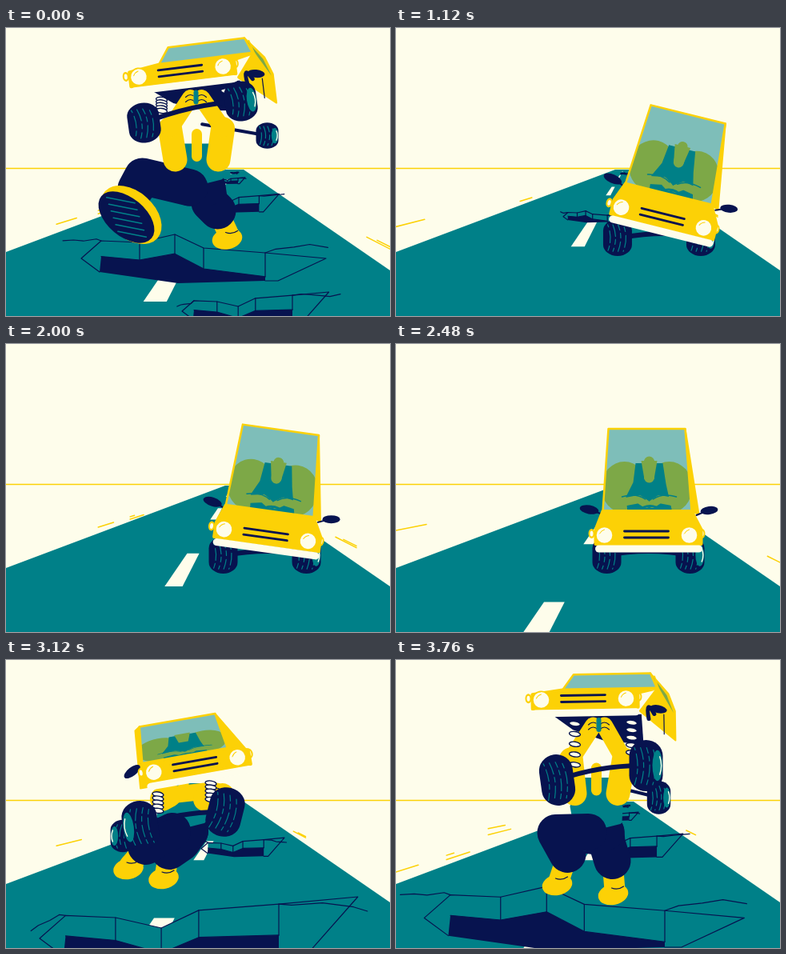
Recreate the animation shown at these times as an HTML page with a canvas. Size 480x360 px, loop 3840 ms.

```html
<!DOCTYPE html>
<html lang="en">
<head>
<meta charset="utf-8">
<title>Bumpy road</title>
<style>
  html, body { margin: 0; width: 100%; height: 100%; overflow: hidden; background: #fefdeb; }
  canvas { display: block; width: 480px; height: 360px; }
</style>
</head>
<body>
<canvas id="stage" width="480" height="360"></canvas>
<script>
const ctx = document.getElementById('stage').getContext('2d');
const CREAM = '#fefdeb', YELLOW = '#fcd106', TEAL = '#008088', NAVY = '#07134f';
const GLASS = 'rgba(0,128,136,.5)';
const STEP = 80, FRAMES = 48, SHRINK = 0.765;
const VP = { x: 285, y: 176 };
ctx.lineCap = ctx.lineJoin = 'round';

// Helpers
const rad = deg => deg * Math.PI / 180;
const mix = (a, b, t) => a + (b - a) * t;

function seeded(seed) {
  return () => (seed = (seed * 16807 + 11) % 2147483647) / 2147483647;
}
function trace(points) {
  ctx.beginPath();
  points.forEach(p => ctx.lineTo(...p));
}
function fill(points, color) {
  trace(points);
  ctx.closePath();
  ctx.fillStyle = color;
  ctx.fill();
}
function line(points, color, width) {
  trace(points);
  ctx.strokeStyle = color;
  ctx.lineWidth = width;
  ctx.stroke();
}
function softFill(points, color, round) {
  fill(points, color);
  line([...points, points[0]], color, round);
}
function oval(x, y, rx, ry, color, rot = 0) {
  ctx.beginPath();
  ctx.ellipse(x, y, rx, ry, rad(rot), 0, 7);
  ctx.fillStyle = color;
  ctx.fill();
}
function bend(from, control, to, color, width) {
  ctx.beginPath();
  ctx.moveTo(...from);
  ctx.quadraticCurveTo(...control, ...to);
  ctx.strokeStyle = color;
  ctx.lineWidth = width;
  ctx.stroke();
}
function local(x, y, rot, draw) {
  ctx.save();
  ctx.translate(x, y);
  ctx.rotate(rad(rot));
  draw();
  ctx.restore();
}

// Scenery: everything on the ground shrinks towards the vanishing point
const ground = (dx, dy, k) => [VP.x + dx * k, VP.y + dy * k];

function drawStreaks(frame) {
  const random = seeded(58);
  for (let i = 0; i < 14; i++) {
    const side = i % 2 ? 1 : -1;
    const slope = side < 0 ? mix(.2, .34, random()) : mix(.44, .54, random());
    const born = Math.floor(random() * 12), size = mix(.8, .99, random());
    const age = (frame - born + 24) % 12;
    if (age > 3) continue;
    const reach = side < 0 ? 290 : 200, k = SHRINK ** age;
    line([1, size].map(r => ground(side * reach * r, reach * r * slope, k)), YELLOW, 1.5);
  }
}

function drawDashes(frame) {
  for (let j = -1; j < 4; j++) {
    const k = SHRINK ** (frame % 4 + 4 * j);
    const corner = (dy, side) => ground(dy * (side * .088 - .595), dy, k);
    fill([corner(112, -1), corner(112, 1), corner(166, 1), corner(166, -1)], CREAM);
  }
}

// frame, centre x, far rim y, scale, direction of the broken edge
const HOLES = [
  [0, 244, 268, 1, 1], [0, 290, 214, .33, -1], [0, 310, 342, .6, -1],
  [6, 300, 222, .32, 1], [14, 245, 231, .24, 1], [39, 237, 322, 1.3, -1], [39, 295, 229, .34, -1]
];

function drawHole([born, cx, cy, scale, dir], frame) {
  const age = (frame - born + 8 + FRAMES) % FRAMES - 8;
  if (age > 13) return;
  const k = SHRINK ** age, random = seeded(born * 31 + cy);
  const at = (x, y) => ground(cx + x * scale - VP.x, cy + y * scale - VP.y, k);
  const corners = [[-125, -2], [-77, 0], [-33, -10 * dir], [3, 7 * dir], [80, 13 * dir]];
  const rim = corners.map(p => at(...p));
  const foot = corners.map(([x, y]) => at(x, y + 22 + (x + 77) / 20));
  const crack = (x, y, dx) => {
    const points = [at(x, y)];
    for (let i = 0; i < 4; i++) points.push(at(x += dx * mix(.5, 1.4, random()), y += mix(-5, 6, random())));
    line(points, NAVY, 1.2);
  };
  const front = [at(80, 48), at(-29, 51), at(-127, 37)];
  fill([...rim, ...foot.slice().reverse()], TEAL);
  fill([...foot, ...front], NAVY);
  line([at(-127, 37), at(-150, 20), ...rim, at(156, 20 * dir), at(96, 48), at(80, 48)], NAVY, 1.2);
  line(foot, NAVY, 1.2);
  rim.slice(1).forEach((p, i) => line([p, foot[i + 1]], NAVY, 1.2));
  crack(-125, -2, -12);
  crack(80, 13 * dir, 22);
}

function drawScenery(frame) {
  ctx.fillStyle = CREAM;
  ctx.fillRect(0, 0, 480, 360);
  fill([[274, 177], [297, 177], [480, 303], [480, 360], [0, 360], [0, 280]], TEAL);
  line([[0, 175.5], [480, 175.5]], YELLOW, 1.5);
  drawStreaks(frame);
  drawDashes(frame);
  HOLES.forEach(hole => drawHole(hole, frame));
}

// Poses: all parts sit relative to the car. glass: sideways turn, height;
// wheels: left, right, rear, radii, splay; legs: knee, ankle, toe
const JUMP = {
  car: [237, 131, -10], glass: [-13, 46], wheels: [-69, 76, 37, 59, -91, 89, 22, 31, 14],
  neck: [-15, 21], waist: [-18, 64], left: [-45, 91, -62, 102, -82, 127], right: [-17, 97, -33, 108, -38, 139],
  sole: [0], size: [1]
};
const STAND = {
  car: [234.5, 49, -1], glass: [36, 19], wheels: [-33, 101, 78, 83, 94, 123, 21, 32, 0],
  neck: [16, 96], waist: [17, 147], left: [-35, 167, -20, 194, -31, 229], right: [29, 179, 36, 202, 39, 241],
  sole: [0], size: [1]
};
const STRIDE = {
  car: [218.5, 54.5, -7], glass: [36, 20], wheels: [-46, 64, 75, 37, 108, 80, 20, 25, -8],
  neck: [20, 88], waist: [22, 126], left: [-48, 131, -56, 146, -68, 178], right: [36, 164, 46, 174, 60, 206],
  sole: [1], size: [1]
};
const DRIVE = { ...JUMP, glass: [0, 103], wheels: [-50, 25, 54, 25, 0, 10, 18, 23, 0], size: [0] };
const at = (pose, x, y, rot = pose.car[2]) => ({ ...pose, car: [x, y, rot] });

const KEYS = [
  [0, STRIDE], [2, at(STAND, 215, 62)], [4, at(JUMP, 205, 176)], [6, at(DRIVE, 199, 246, -14)],
  [14, at(DRIVE, 333, 237, 14)], [19, at(DRIVE, 198, 242, -12)], [25, at(DRIVE, 325, 239, 8)],
  [31, at(DRIVE, 313.5, 239, 0)], [36, at(DRIVE, 258, 241, -5)], [39, JUMP], [42, at(JUMP, 241, 138)],
  [44, at(STRIDE, 230, 59)], [47, STAND], [48, STRIDE]
];

function poseAt(frame) {
  const next = KEYS.findIndex(key => key[0] > frame);
  const [start, from] = KEYS[next - 1], [end, to] = KEYS[next];
  const t = (frame - start) / (end - start), eased = t * t * (3 - 2 * t);
  const pose = {};
  for (const part in from) pose[part] = from[part].map((v, i) => mix(v, to[part][i], eased));
  return pose;
}

// Vehicle
function drawWheel(x, y, rx, ry, rot, hub = 0) {
  local(x, y, rot, () => {
    ctx.beginPath();
    ctx.roundRect(-rx, -ry, rx * 2, ry * 2, { x: rx, y: ry * .62 });
    ctx.fillStyle = NAVY;
    ctx.fill();
    ctx.setLineDash([15, 4, 6, 5]);
    for (let i = -1; i < 3; i++) {
      const tx = rx * (i * .36 - .2), bow = rx * .25 * (hub || 1);
      ctx.lineDashOffset = i * 8;
      bend([tx - bow * .5, -ry * .7], [tx + bow, 0], [tx - bow * .5, ry * .75], TEAL, 1.2);
    }
    ctx.setLineDash([]);
    if (hub) {
      oval(hub * rx * .68, 0, rx * .3, ry * .6, TEAL);
      bend([hub * rx * .82, -ry * .35], [hub * rx, 0], [hub * rx * .82, ry * .35], CREAM, 1.4);
    }
  });
}

function drawSpring(x, top, bottom) {
  const turns = 5;
  for (let i = 0; i < turns; i++) {
    const y = mix(top, bottom, i / (turns - 1));
    oval(x, y, 7, 3, CREAM, 8);
    ctx.strokeStyle = NAVY;
    ctx.lineWidth = 1.4;
    ctx.stroke();
  }
}

function drawDriver(withHead) {
  for (const side of [-1, 1]) oval(side * 28, -30, 29, 32, YELLOW);
  fill([[-14, -60], [20, -60], [24, -34], [32, 2], [-24, 2], [-26, -18], [-17, -36]], TEAL);
  fill([[-7, -63], [13, -63], [9, -40], [-3, -40]], YELLOW);
  if (withHead) line([[3, -62], [3, -42]], YELLOW, 13);
  for (const side of [-1, 1]) {
    line([[3 + side * 34, -11], [3 + side * 13, -15], [3 + side * 4, -9]], YELLOW, 10);
    bend([3 + side * 34, -18], [3 + side * 16, -23], [3 + side * 5, -15], TEAL, 1.5);
  }
  bend([-12, 0], [4, -13], [20, 0], TEAL, 3);
}

function drawUnderside({ car, glass: [turn] }) {
  if (turn < 10) return;
  local(0, 0, car[2], () =>
    fill([[-38, 20], [72, 20], [74, 58], [24, 52], [-14, 38]], NAVY));
}

function drawSide(turn, roof, sill) {
  const back = 70 + turn * 1.25, up = turn * .47, down = 12 + turn * 1.15;
  softFill([roof, [back - 9, up - 22], [back - 1, up], [back - 1, down], [70, 16], sill], YELLOW, 2);
  if (turn < 12) return;
  fill([[roof[0] + 2, roof[1] + 3], [back - 11, up - 20], [back - 3, up + 2], [sill[0] + 6, sill[1] + 6]], GLASS);
  line([[roof[0] + 5, roof[1] + 4], [back - 14, up - 4]], YELLOW, 2);
  line([[back - 15, up + 4], [back - 15, down - 8]], NAVY, 1.2);
  bend([81, 26], [77, 0], [88, 20], NAVY, 5);
}

function drawCar({ car, glass: [turn, tall] }) {
  const lift = Math.min(1, (103 - tall) / 60);
  const base = -30 + 18 * lift, top = base - tall;
  const pane = [[turn - 48, top], [turn + 48, top], [turn + 56, base], [turn - 55 - turn * .2, base]];
  const [roofLeft, roofRight, sillRight, sillLeft] = pane;
  local(0, 0, car[2], () => {
    if (turn > 8) drawSide(turn, roofRight, sillRight);
    else softFill([roofRight, [65, base + 4], sillRight], YELLOW, 2);
    if (turn < -4) softFill([roofLeft, [roofLeft[0] - 6, top + 4], [-73, base + 30], [-60, base + 30], sillLeft], YELLOW, 2);
    fill(pane, CREAM);
    if (tall > 30) {
      ctx.save();
      trace(pane);
      ctx.clip();
      ctx.translate(turn, base);
      ctx.scale(1, tall / 103);
      drawDriver(tall > 70);
      ctx.restore();
    }
    fill(pane, GLASS);
    line([sillLeft, roofLeft, roofRight, sillRight], YELLOW, 2.5);

    if (turn < 10) {
      oval(-72 - 8 * lift, base - 2 + 10 * lift, 12, 5.5, NAVY, 10 - 40 * lift);
      line([[-66, base], [-55, base + 4]], NAVY, 2);
    }
    if (turn > -5) {
      oval(78 + 15 * lift, base - 1 + 27 * lift, 11, 5, NAVY, -8 + 20 * lift);
      if (lift < .5) line([[74, base], [62, base + 5]], NAVY, 2);
    }
    for (const side of [-1, 1]) {
      oval(side * 69, -2, 4, 6, YELLOW);
      oval(side * 69, -2, 2, 3.5, CREAM);
    }
    softFill([sillLeft, sillRight, [68, -7], [68, 11], [-64, 11], [-64, -7]], YELLOW, 4);
    line([[-60, 17], [65, 17]], CREAM, 9);
    for (const x of [-53, 53]) {
      oval(x, 0, 11.5, 11.5, YELLOW);
      oval(x, 0, 9.8, 9.8, CREAM);
      bend([x - 6, -2], [x - 4, -6], [x, -7], YELLOW, 1);
    }
    for (const y of [-5, 3]) line([[-28, y], [27, y]], NAVY, 2.8);
  });
}

// Runner
function drawSole(x, y) {
  oval(x + 6, y + 1, 44, 29, YELLOW, 42);
  local(x, y + 4, 40, () => {
    oval(0, 0, 41, 24, NAVY);
    ctx.rotate(rad(-32));
    for (let i = -2; i < 4; i++) {
      const shift = i * 4 - 2;
      line([[shift - 18, i * 8 - 5], [shift + 18, i * 8 - 3]], TEAL, 1.6);
    }
  });
}

function drawLeg(hip, [kx, ky, ax, ay, tx, ty], size, sole) {
  if (sole < .5) {
    line([[ax, ay], [tx, ty - 2]], YELLOW, 26 * size);
    oval(tx - 2, ty + 3, 19 * size, 13 * size, YELLOW, -12);
    bend([tx - 4, ty - 5], [tx + 4, ty - 2], [tx + 11, ty - 7], NAVY, 1.2);
  }
  line([hip, [kx, ky], [ax, ay]], NAVY, 46 * size);
  if (sole >= .5) drawSole(tx, ty);
}

function drawRunner({ neck: [nx, ny], waist: [wx, wy], left, right, sole, size: [size] }) {
  if (size < .05) return;
  const hipY = wy + 19;
  drawLeg([wx + 11, hipY], right, size, 0);
  line([[wx - 11, hipY], [wx + 11, hipY]], NAVY, 46 * size);
  softFill([[nx - 20, ny + 5], [nx + 20, ny + 5], [nx + 30, ny + 38], [wx + 28, wy + 6],
    [wx + 8, wy + 11], [wx - 28, wy + 3], [nx - 30, ny + 38]], TEAL, 6 * size);
  drawLeg([wx - 11, hipY], left, size, sole[0]);

  for (const side of [-1, 1]) {
    const shoulder = [nx + side * 27, ny + 22], hand = [19 + side * 7, 33];
    const elbow = [mix(shoulder[0], hand[0], .45) + side * 15, mix(shoulder[1], hand[1], .5)];
    line([shoulder, elbow], YELLOW, 30 * size);
    line([elbow, hand], YELLOW, 21 * size);
    oval(...hand, 9, 9, YELLOW);
    for (const dy of [-3, 3]) {
      bend([hand[0] - 6, hand[1] + dy + 2], [hand[0], hand[1] + dy - 4], [hand[0] + 6, hand[1] + dy + 2], NAVY, 1.1);
    }
  }
  line([[19, 26], [19, 38]], TEAL, 6);
  line([[nx, ny - 10], [nx, ny + 18]], YELLOW, 13 * size);
}

function drawScene(frame) {
  drawScenery(frame);
  const pose = poseAt(frame);
  const [lx, ly, rx, ry, bx, by, w, h, splay] = pose.wheels;
  const [x, y, rot] = pose.car, turn = pose.glass[0];
  const lifted = pose.size[0] > .4;
  const drift = lifted ? 0 : -25 * Math.sin(rad(rot));
  const hub = turn < -4 ? -1 : 1;
  const frontWheels = () => {
    drawWheel(lx + drift, ly, w, h, lifted ? -8 : 0, hub < 0 ? hub : 0);
    drawWheel(rx + drift, ry, w, h, splay, hub > 0 ? hub : 0);
  };
  ctx.save();
  ctx.translate(x, y);
  if (lifted) {
    line([[mix(lx, rx, .6), mix(ly, ry, .6) + 18], [bx, by]], NAVY, 4);
    drawWheel(bx, by, w * .7, h * .65, 0, hub);
    drawUnderside(pose);
  }
  drawRunner(pose);
  bend([lx, ly], [mix(lx, rx, .5), mix(ly, ry, .5) - 10], [rx, ry], NAVY, 6);
  if (lifted) {
    const tilt = Math.sin(rad(rot));
    drawSpring(lx + 22, 30 - 40 * tilt, ly - h * .6);
    drawSpring(rx - 18, 30 + 40 * tilt, ry - h * .5);
    drawCar(pose);
    frontWheels();
  } else {
    frontWheels();
    drawCar(pose);
  }
  ctx.restore();
}

const begin = performance.now();
function tick() {
  drawScene(Math.floor((performance.now() - begin) / STEP) % FRAMES);
  requestAnimationFrame(tick);
}
tick();
</script>
</body>
</html>
```
